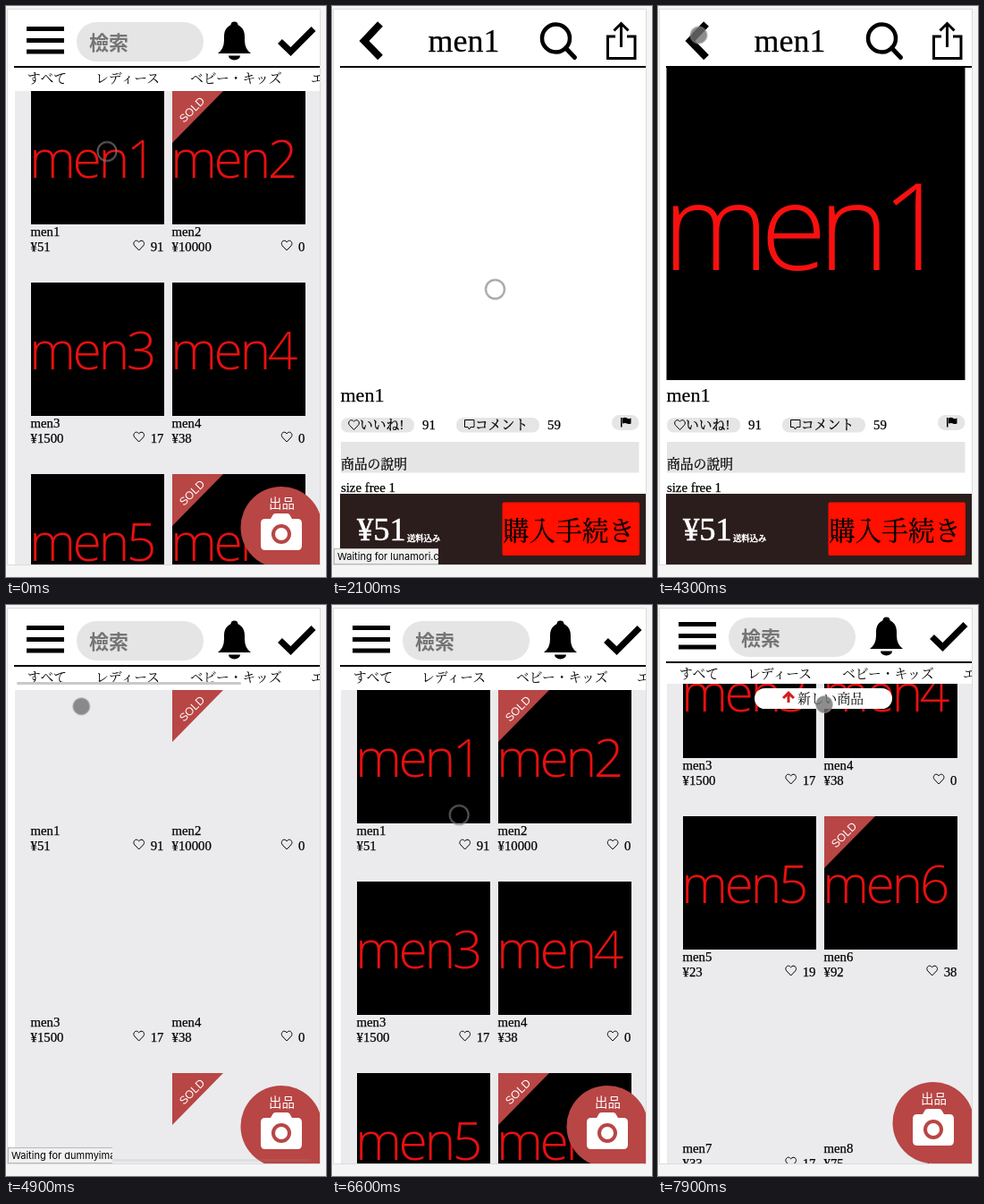
Animation, 358 px wide and 638 px high, one loop 8 s. Source, as an HTML page:

```html
<!DOCTYPE html>
<html lang="ja">
<head>
<meta charset="utf-8">
<title>Shop</title>
<style>
html, body { margin: 0; width: 100%; height: 100%; overflow: hidden; background: #f5f5f5; }
svg { display: block; }
text { font: 14.8px "Liberation Serif", "Noto Serif CJK JP", "Noto Sans CJK JP", serif; white-space: pre; }
#labels text, #detail text { stroke: #000; stroke-width: .25px; }
#detail text.white { stroke: #fff; stroke-width: .6px; }
#detail .pic text, #labels .sold { stroke: none; }
.pic text { font: 300 59px "Open Sans", sans-serif; letter-spacing: -3.5px; fill: #e81010; }
.pic .big { font-size: 135px; letter-spacing: -9.5px; fill: #f81010; }
.sold { font: 12.5px "Liberation Sans", Arial, sans-serif; fill: #fff; text-anchor: middle; }
.sell { font: 14.5px "Noto Sans CJK JP", sans-serif; }
.search { font: bold 22px "Noto Sans CJK JP", sans-serif; fill: #757575; }
.status text { font: 11px Inter, sans-serif; }
.status rect { fill: #f1f1f1; stroke: #b8b8b8; }
.end { text-anchor: end; }
.line { fill: none; stroke: #000; }
.soft { fill: #e6e5e6; }
.brand { fill: #b84645; }
.white { fill: #fff; }

/* hard changes */
.step { animation: 8s step-end infinite; }
#detail { animation-name: detail; }
#pics { animation-name: pics; }
#share { animation-name: share; }
#wait { animation-name: wait; }
#data { animation-name: data; }
#photo { animation-name: photo; }
#status1 { animation-name: status1; }
#status2 { animation-name: status2; }
#bars { animation-name: bars; }
#fresh { animation-name: fresh; }
#press { animation-name: press; }
#ring { animation-name: ring; }
@keyframes detail { 0%, 58.75% { opacity: 0 } 12.5% { opacity: 1 } }
@keyframes pics { 0%, 72.5% { opacity: 1 } 12.5% { opacity: 0 } }
@keyframes share { 0% { opacity: 0 } 20% { opacity: 1 } }
@keyframes wait { 0% { opacity: 1 } 25% { opacity: 0 } }
@keyframes data { 0% { opacity: 0 } 25% { opacity: 1 } }
@keyframes photo { 0% { opacity: 0 } 28.75% { opacity: 1 } }
@keyframes status1 { 0%, 28.75% { opacity: 0 } 6.25% { opacity: 1 } }
@keyframes status2 { 0%, 73.75% { opacity: 0 } 58.75% { opacity: 1 } }
@keyframes bars { 0%, 75% { opacity: 0 } 58.75% { opacity: 1 } }
@keyframes fresh { 0% { opacity: 0 } 97.5% { opacity: 1 } }
@keyframes press {
  0%, 6.25%, 25%, 70%, 90% { opacity: 0 }
  2.5%, 12.5%, 51.25%, 85%, 92.5% { opacity: 1 }
}
@keyframes ring {
  0%, 6.25%, 25%, 70%, 90% { opacity: 1 }
  2.5%, 12.5%, 51.25%, 85%, 92.5% { opacity: 0 }
}

/* movement */
.move { animation: 8s linear infinite; }
#list { animation-name: scroll; }
.dock { animation-name: dock; }
#cursor { animation-name: cursor; }
@keyframes scroll {
  0%, 85% { transform: translateY(0) }
  90%, 92.5% { transform: translateY(-160px) }
  96.25% { transform: translateY(-349px) }
  98.75%, 100% { transform: translateY(-287px) }
}
@keyframes dock {
  0%, 85% { transform: translateY(0) }
  86.25%, 100% { transform: translateY(-4px) }
}
@keyframes cursor {
  0%, 7.5% { transform: translate(113px, 162.5px) }
  12.5% { transform: translate(150px, 240px) }
  15%, 36.25% { transform: translate(182.5px, 316.5px) }
  37.5% { transform: translate(120px, 226px) }
  38.75% { transform: translate(54px, 430px) }
  40% { transform: translate(54px, 580px) }
  41.25%, 45% { transform: translate(315px, 585px) }
  51.25%, 58.75% { transform: translate(45.5px, 32.5px) }
  65%, 82.5% { transform: translate(142px, 233.5px) }
  85% { transform: translate(190px, 440px) }
  90% { transform: translate(190px, 280px) }
  92.5% { transform: translate(188px, 238px) }
  96.25% { transform: translate(186px, 49px) }
  98.75%, 100% { transform: translate(186px, 111px) }
}
</style>
</head>
<body>
<svg width="358" height="638" viewBox="0 0 358 638">
  <defs>
    <clipPath id="page"><path d="M2 4H351V624H2Z"/></clipPath>
    <clipPath id="tip"><path d="M2 606H119V624H2Z"/></clipPath>
    <path id="heart" class="line" d="M6.5 11.5L1.6 6.4C-1 3.2 2.4-.8 5.3 1.2L6.5 2.3 7.7 1.2C10.6-.8 14 3.2 11.4 6.4Z"/>
  </defs>
  <rect x="1.5" y="3.5" width="350" height="621" fill="#fff" stroke="#dcdcdc"/>

  <g clip-path="url(#page)">
    <g id="list" class="move">
      <path d="M10 95H351V1000H10Z" fill="#ebebed"/>
      <g id="pics" class="step pic"></g>
      <g id="labels"></g>
    </g>

    <g class="move dock">
      <path class="white" d="M2 0H351V92H2Z"/>
      <path class="line" stroke-width="5" d="M23 25.5H65M23 38.5H65M23 51H65"/>
      <rect class="soft" x="79" y="18" width="142" height="44" rx="22"/>
      <text class="search" x="93" y="49">檢索</text>
      <circle cx="255.5" cy="21.5" r="4"/>
      <path d="M237 53q7-5 7-15v-4c0-18 23-18 23 0v4q0 10 7 15zM249 55.5a6.5 5 0 0 0 13 0z"/>
      <path class="line" stroke-width="7" d="M306.5 39.5L318.5 51 344 25.5"/>
      <path d="M9 67H351V69H9Z"/>
      <text x="24" y="86">すべて</text>
      <text x="100" y="86">レディース</text>
      <text x="206" y="86">ベビー・キッズ</text>
      <text x="341" y="86">エ</text>
    </g>

    <g id="fresh" class="step">
      <rect class="white" x="108" y="93" width="154" height="23" rx="11.5"/>
      <path d="M146 96l7 7-2 2-3.5-3v7h-3v-7l-3.5 3-2-2z" fill="#d3201f"/>
      <text x="156" y="109.5">新しい商品</text>
    </g>

    <g class="move dock">
      <circle cx="309" cy="584" r="45" fill="#000" opacity=".18"/>
      <path class="brand" d="M353.5 582V628H308A45.5 45.5 0 1 1 353.5 582Z"/>
      <text class="white sell" x="294" y="561">出品</text>
      <path class="white" d="M290 573h6l3-5q1-1 3-1h12q2 0 3 1l3 5h6q5 0 5 5v25q0 5-5 5h-36q-5 0-5-5v-25q0-5 5-5z"/>
      <circle class="brand" cx="308" cy="590" r="11"/>
      <circle class="white" cx="308" cy="590" r="7"/>
    </g>

    <g id="bars" class="step">
      <rect x="12" y="86" width="251" height="3" rx="1.5" fill="#c9c9c9"/>
      <rect x="12" y="619" width="329" height="3" rx="1.5" fill="#999" opacity=".15"/>
    </g>

    <g id="detail" class="step">
      <path class="white" d="M2 4H351V624H2Z"/>
      <path class="line" stroke-width="8" d="M54 20L36 39 54 57.5"/>
      <circle class="line" cx="250.5" cy="36" r="15.5" stroke-width="4.5"/>
      <path class="line" stroke-width="5" stroke-linecap="round" d="M261.5 47L271.5 57.5"/>
      <path id="share" class="line step" stroke-width="3" d="M317 34H308.5V58.5H339V34H330M323.500 46V20M315.5 27.5L323.5 19.5 331.5 27.5"/>
      <path d="M9 67H351V69H9Z"/>

      <rect class="soft" x="10" y="460" width="82" height="16.5" rx="8"/>
      <use href="#heart" x="18" y="462"/>
      <text x="31" y="473">いいね!</text>
      <rect class="soft" x="313" y="457" width="30.5" height="17" rx="8.5"/>
      <path class="soft" d="M10 487H343.5V521.5H10Z"/>
      <text x="10" y="516.5">商品の說明</text>
      <path d="M9 545H351V624H9Z" fill="#2c1d1d"/>
      <rect x="190.5" y="554.5" width="153.5" height="59.5" rx="2" fill="#ff1000"/>
      <text x="191" y="597" style="font-size:29.6px">購入手続き</text>

      <g id="wait" class="step">
        <text x="136" y="51" style="font-size:36px">...</text>
        <text x="10" y="442" style="font-size:22px">...</text>
        <rect class="soft" x="120" y="460" width="90" height="16.5" rx="8"/>
        <text x="142" y="473">コメント</text>
        <text x="10" y="543">{ITME_DESCRIPTION}</text>
      </g>

      <g id="data" class="step">
        <text x="107.5" y="51" style="font-size:36px">men1</text>
        <text x="9.5" y="442" style="font-size:22px">men1</text>
        <text x="101" y="473">91</text>
        <rect class="soft" x="139" y="460" width="93" height="16.5" rx="8"/>
        <path class="line" d="M148.5 462.5H159V470.5H155L153.5 473 152 470.5H148.5Z"/>
        <text x="160" y="473">コメント</text>
        <text x="241" y="473">59</text>
        <path d="M323 460h1.5v10.5H323zM325 460.5q3-1.5 5 0t4.5 0v6q-2.5 1-4.5 0t-5 0z"/>
        <text x="10" y="543">size free 1</text>
        <text class="white" x="28" y="597" style="font-size:36.5px">¥51</text>
        <text class="white" x="84" y="597.5" style="font-size:9.3px">送料込み</text>
      </g>

      <g id="photo" class="step pic">
        <path d="M9.5 69H343.5V418H9.5Z"/>
        <text class="big" x="5" y="295">men1</text>
      </g>
    </g>
  </g>

  <g clip-path="url(#tip)">
    <g id="status1" class="status step">
      <rect x="2.5" y="606.5" width="130" height="17"/>
      <text x="6" y="619">Waiting for lunamori.com...</text>
    </g>
    <g id="status2" class="status step">
      <rect x="2.5" y="606.5" width="130" height="17"/>
      <text x="6" y="619">Waiting for dummyimage.com...</text>
    </g>
  </g>

  <g id="cursor" class="move">
    <circle id="press" class="step" r="9.5" fill="#707070" fill-opacity=".8" stroke="#aaa" stroke-opacity=".6"/>
    <circle id="ring" class="step" r="10.5" fill="none" stroke="#777" stroke-opacity=".75" stroke-width="2"/>
  </g>
</svg>
<script>
// price, likes, sold
const items = [
  [51, 91], [10000, 0, true], [1500, 17], [38, 0],
  [23, 19], [92, 38, true], [33, 17], [75, 17]
];
const loaded = 6;
let pics = '', labels = '';

items.forEach(([price, likes, sold], i) => {
  const x = 28 + i % 2 * 158;
  const y = 95 + (i >> 1) * 214;
  const name = 'men' + (i + 1);
  const heartX = x + 129 - String(likes).length * 7.4;
  if (i < loaded) {
    pics += `<rect x="${x}" y="${y}" width="149" height="149"/>
      <text x="${x - 2}" y="${y + 97}">${name}</text>`;
  }
  labels += `<text x="${x - .5}" y="${y + 162}">${name}</text>
    <text x="${x - .5}" y="${y + 179}">¥${price}</text>
    <use href="#heart" x="${heartX}" y="${y + 166.5}"/>
    <text class="end" x="${x + 148.5}" y="${y + 179}">${likes}</text>`;
  if (sold) {
    labels += `<path class="brand" d="M${x} ${y}h57l-57 58z"/>
      <text class="sold" transform="translate(${x + 25} ${y + 24}) rotate(-45)">SOLD</text>`;
  }
});

document.getElementById('pics').innerHTML = pics;
document.getElementById('labels').innerHTML = labels;
</script>
</body>
</html>
```
